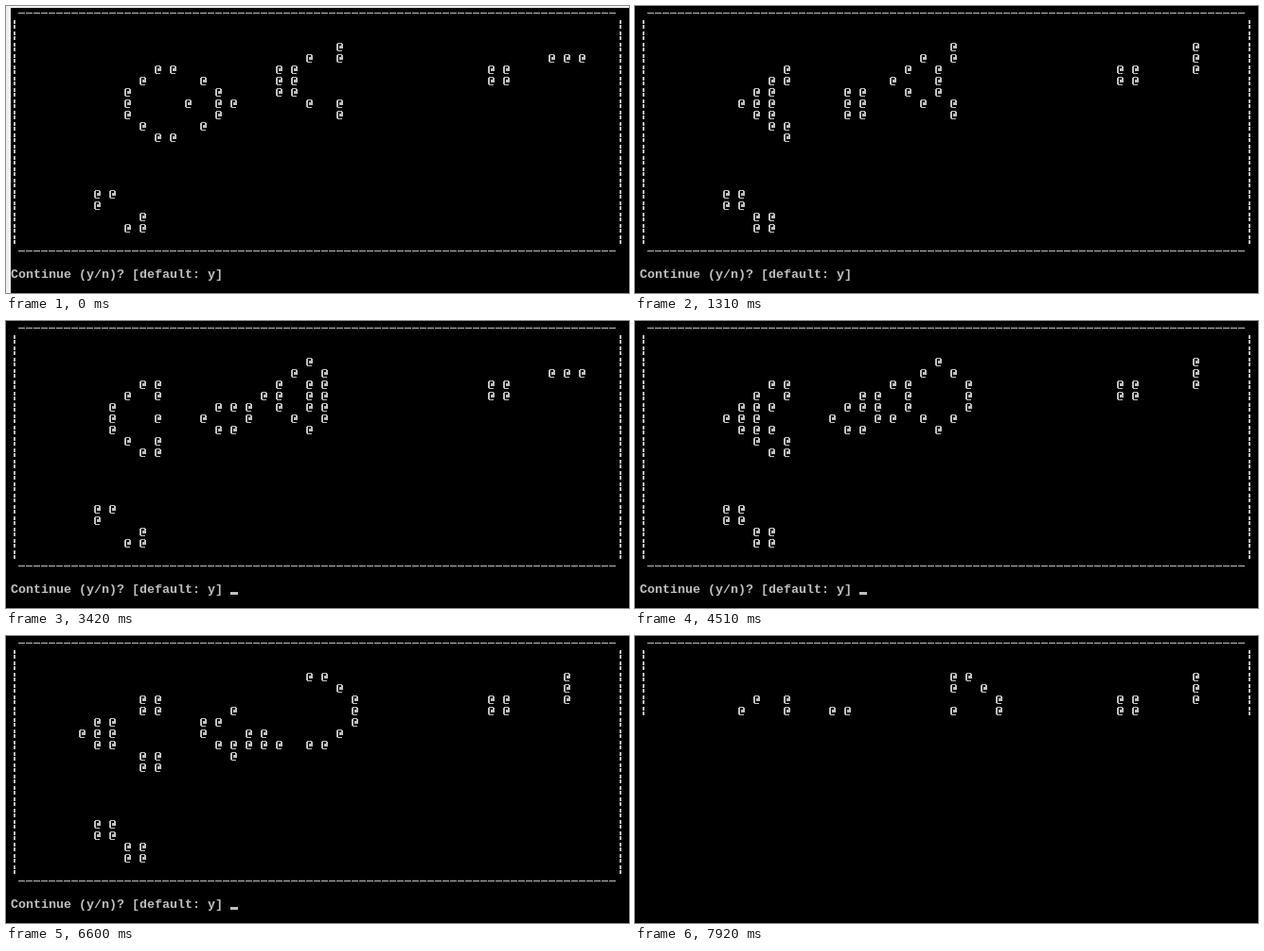
An HTML page with a canvas that plays this animation: 658 by 304 pixels, repeating every 7.99 s.

```html
<!DOCTYPE html>
<html lang="en">
<head>
<meta charset="utf-8">
<title>Game of Life in a terminal</title>
<style>
html, body { margin: 0; width: 100%; height: 100%; overflow: hidden; background: #000; }
canvas { display: block; }
</style>
</head>
<body>
<canvas id="stage" width="658" height="304"></canvas>
<script>
const ctx = document.getElementById('stage').getContext('2d');
const LOOP = 7990, COLS = 40, ROWS = 20;
const CHAR_W = 8, CHAR_H = 12, LEFT = 5, TOP = 2;
const INK = '#c0c0c0', WINDOW_EDGE = '#f0f0f0';
const WINDOW_EDGE_END = 760;
const ROWS_IN_LAST_PRINT = 6;

// Irregular key presses: when each generation is printed and its cursor lights up.
const PRINTS = [
  { at: 0 },
  { at: 1310, cursor: 1860 },
  { at: 2410, cursor: 3420 },
  { at: 3500, cursor: 4510 },
  { at: 4730, cursor: 5590 },
  { at: 5740, cursor: 6600 },
  { at: 6910, cursor: 7690 },
  { at: 7920 }
];

function makeGrid(rule) {
  return Array.from({ length: ROWS }, (_, y) =>
    Array.from({ length: COLS }, (_, x) => rule(x, y)));
}

function nextGeneration(grid) {
  return makeGrid((x, y) => {
    let near = 0;
    for (let dy = -1; dy <= 1; dy++) {
      for (let dx = -1; dx <= 1; dx++) {
        if ((dx || dy) && grid[y + dy]?.[x + dx]) near++;
      }
    }
    return near === 3 || (near === 2 && grid[y][x]);
  });
}

function seedColony() {
  const grid = makeGrid(() => false);
  const fill = (x, y, w = 1, h = 1) => {
    for (let row = y; row < y + h; row++) grid[row].fill(true, x, x + w);
  };
  const mirror = (x, axis, offset, w) => {
    fill(x, axis - offset, w);
    fill(x, axis + offset, w);
  };

  // Round left half of the glider gun.
  for (let offset = 0; offset <= 3; offset++) {
    const inset = Math.max(0, offset - 1);
    mirror(7 + inset, 7, offset);
    mirror(13 - inset * (inset + 1) / 2, 7, offset);
  }
  fill(11, 7);
  fill(14, 7);

  // Right half of the gun, then its end block.
  fill(17, 4, 2, 3);
  mirror(19, 5, 2);
  mirror(21, 5, 2);
  mirror(21, 5, 3);
  fill(31, 4, 2, 2);

  // Blinker and beacon.
  fill(35, 3, 3);
  fill(5, 15, 2);
  fill(5, 16);
  fill(8, 17);
  fill(7, 18, 2);
  return grid;
}

const generations = [seedColony()];
while (generations.length < PRINTS.length) {
  generations.push(nextGeneration(generations.at(-1)));
}

const colX = col => LEFT + col * CHAR_W;
const rowY = row => TOP + row * CHAR_H;
const rect = (x, y, w, h) => ctx.fillRect(x, y, w, h);

function drawAt(col, row) {
  const x = colX(col), y = rowY(row) + 1;
  rect(x + 1, y, 5, 1);
  rect(x, y + 1, 2, 7);
  rect(x + 5, y + 1, 2, 2);
  rect(x + 3, y + 3, 4, 3);
  rect(x + 1, y + 8, 5, 1);
}

function drawBar(col, row) {
  const x = colX(col) + 3, y = rowY(row) + 1;
  rect(x, y, 2, 4);
  rect(x, y + 5, 2, 4);
}

function drawRule(row) {
  for (let col = 1; col < COLS * 2; col++) rect(colX(col), rowY(row) + 5, 7, 1);
}

function drawPrompt(cursor) {
  ctx.font = 'bold 13.333px "Liberation Mono", monospace';
  ctx.fillText('Continue (y/n)? [default: y]', LEFT, rowY(23) + 10);
  if (cursor) rect(colX(29), rowY(24) - 3, CHAR_W, 3);
}

function draw(time) {
  const gen = PRINTS.findLastIndex(print => time >= print.at);
  const partial = gen === PRINTS.length - 1;
  const rows = partial ? ROWS_IN_LAST_PRINT : ROWS;

  ctx.fillStyle = '#000';
  rect(0, 0, 658, 304);
  if (time < WINDOW_EDGE_END) {
    ctx.fillStyle = WINDOW_EDGE;
    rect(0, 0, LEFT, 304);
    rect(0, 0, 658, TOP);
  }

  ctx.fillStyle = INK;
  drawRule(0);
  for (let y = 0; y < rows; y++) {
    drawBar(0, y + 1);
    drawBar(COLS * 2, y + 1);
    generations[gen][y].forEach((alive, x) => alive && drawAt(x * 2 + 1, y + 1));
  }
  if (!partial) {
    drawRule(ROWS + 1);
    drawPrompt(time >= PRINTS[gen].cursor);
  }
}

let origin;
function tick(now) {
  origin ??= now;
  draw((now - origin) % LOOP);
  requestAnimationFrame(tick);
}
draw(0);
requestAnimationFrame(tick);
</script>
</body>
</html>
```
